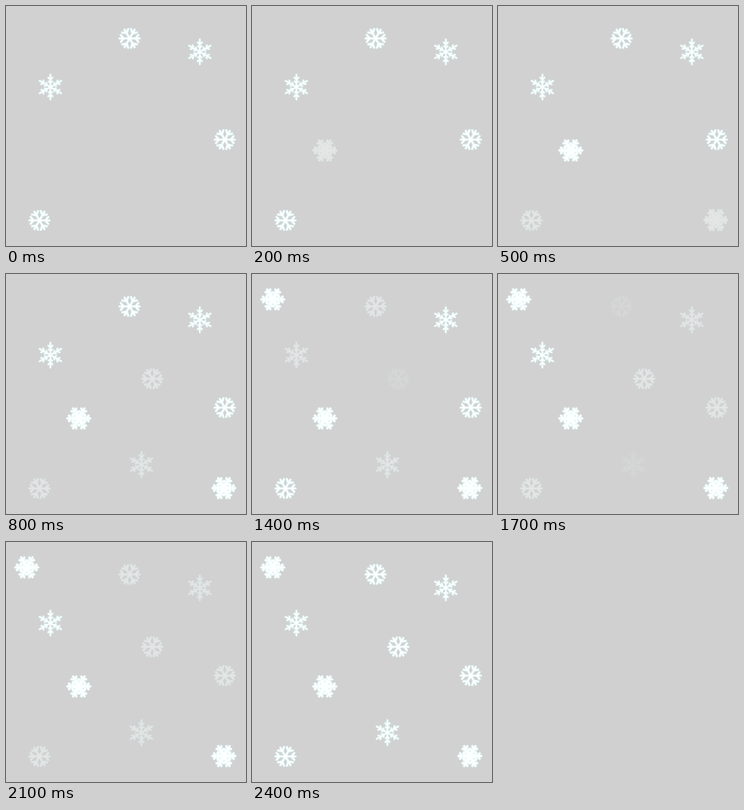
An HTML page for the animation above (2.5 s loop, 300 px wide and 300 px high).

```html
<!DOCTYPE html>
<html lang="en">
<head>
<meta charset="utf-8">
<title>Snowflakes</title>
<style>
  html, body { margin: 0; width: 100%; height: 100%; overflow: hidden; background: #d1d1d1; }
  svg { display: block; width: 100%; height: 100%; }
  path { fill: none; stroke-linecap: round; stroke-linejoin: round; }
</style>
</head>
<body>
<svg id="sky" viewBox="0 0 300 300"></svg>
<script>
const NS = 'http://www.w3.org/2000/svg';
const LOOP = 2500;
const HALF = 0.45, FAINT = 0.12;

// Each arm lies along the x axis: stem length, then pairs of twigs [root, tip x, tip y].
const KINDS = {
  round: { turn: 0, stem: 12.6, twigs: [[7.4, 11, 4.3]], width: 2, core: 2.2, edge: 1.2 },
  star: { turn: 30, stem: 15.6, twigs: [[5, 7, 2.2], [9.2, 11.8, 2.7]], width: 1.5, core: 1.8, edge: 1.3 },
  broad: { turn: 0, stem: 14.2, twigs: [[5.5, 8, 3.6], [9.5, 12.2, 3.4]], width: 2.5, core: 5.5, edge: 1 }
};

// Kind, centre, then [start time, opacity] steps.
const FLAKES = [
  ['round', 154.5, 40.5, [[0, 1], [1400, HALF], [1700, FAINT], [2100, HALF], [2400, 1]]],
  ['round', 273.5, 167, [[0, 1], [1700, HALF], [2400, 1]]],
  ['round', 41.8, 268, [[0, 1], [500, HALF], [1400, 1], [1700, HALF], [2400, 1]]],
  ['round', 182.8, 131, [[0, 0], [800, HALF], [1400, FAINT], [1700, HALF], [2400, 1]]],
  ['star', 55.5, 101.3, [[0, 1], [1100, HALF], [1700, 1]]],
  ['star', 242.3, 57.3, [[0, 1], [1700, HALF], [2400, 1]]],
  ['star', 169.3, 238.3, [[0, 0], [800, HALF], [1700, FAINT], [2100, HALF], [2400, 1]]],
  ['broad', 91, 180.5, [[0, 0], [200, HALF], [500, 1]]],
  ['broad', 26, 31.7, [[0, 0], [1100, HALF], [1400, 1]]],
  ['broad', 272.3, 267.6, [[0, 0], [500, HALF], [800, 1]]]
];

const sky = document.getElementById('sky');

function add(parent, tag, attrs) {
  const node = document.createElementNS(NS, tag);
  for (const key in attrs) node.setAttribute(key, attrs[key]);
  return parent.appendChild(node);
}

function outline({ turn, stem, twigs }) {
  let d = '';
  for (let i = 0; i < 6; i++) {
    const a = (turn + i * 60) * Math.PI / 180;
    const at = (x, y) =>
      (x * Math.cos(a) - y * Math.sin(a)).toFixed(2) + ' ' +
      (x * Math.sin(a) + y * Math.cos(a)).toFixed(2);
    d += `M0 0L${at(stem, 0)}`;
    for (const [root, x, y] of twigs) {
      d += `M${at(x, -y)}L${at(root, 0)}L${at(x, y)}`;
    }
  }
  return d;
}

function makeFlake([name, x, y, steps]) {
  const kind = KINDS[name];
  const node = add(sky, 'g', { transform: `translate(${x} ${y})` });
  const d = outline(kind);
  for (const [color, grow] of [['#d9f0ee', kind.edge], ['#fbffff', 0]]) {
    add(node, 'path', { d, stroke: color, 'stroke-width': kind.width + grow });
    add(node, 'circle', { r: kind.core + grow / 2, fill: color });
  }
  return { node, steps };
}

const flakes = FLAKES.map(makeFlake);

function draw(t) {
  for (const { node, steps } of flakes) {
    let opacity = 0;
    for (const [start, value] of steps) if (t >= start) opacity = value;
    node.setAttribute('opacity', opacity);
  }
}

const begin = performance.now();
function tick() {
  draw((performance.now() - begin) % LOOP);
  requestAnimationFrame(tick);
}
tick();
</script>
</body>
</html>
```
